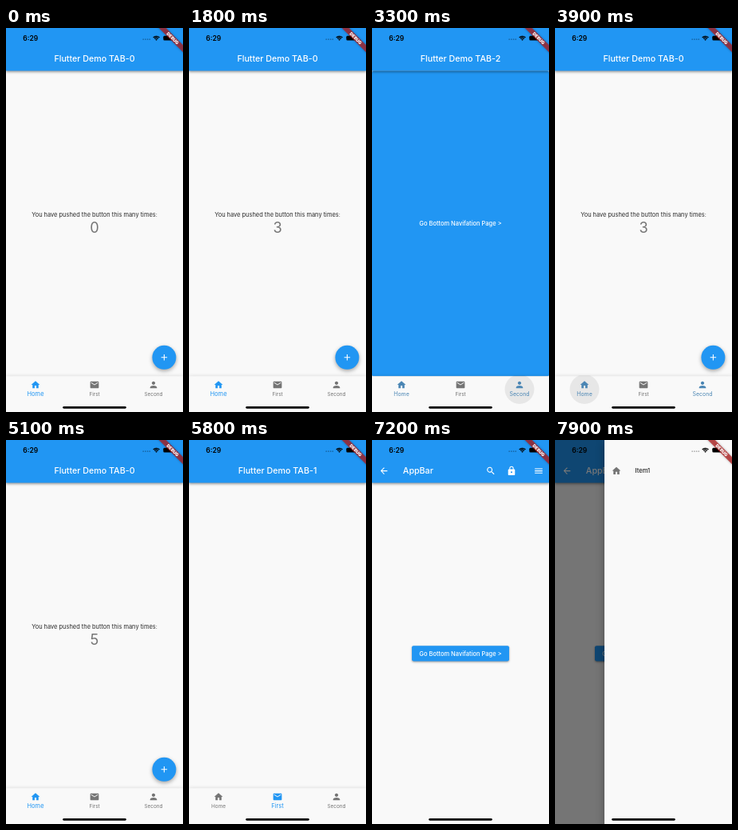
These frames come from a looping animation (222 by 480 pixels, 8 s). An HTML page with a canvas:

```html
<!DOCTYPE html>
<html lang="en">
<head>
<meta charset="utf-8">
<title>Tab demo</title>
<style>
html, body { margin: 0; width: 100%; height: 100%; overflow: hidden; background: #f9f9f9; }
canvas { display: block; width: 222px; height: 480px; }
</style>
</head>
<body>
<canvas id="stage"></canvas>
<script>
const W = 222, H = 480, LOOP = 8000, STEP = 100;
const BAR = 53.6, NAV = 435.3, MID = 38.6;
const BLUE = '#2196f3', PAPER = '#f9f9f9', GREY = '#757575';
const FONT = 'Inter, "Liberation Sans", sans-serif';

const canvas = document.getElementById('stage');
const c = canvas.getContext('2d');
const dpr = Math.max(1, window.devicePixelRatio || 1);
canvas.width = W * dpr;
canvas.height = H * dpr;

// 24-unit icon outlines
const ICON = {
  home: 'M10 20v-6h4v6h5v-8h3L12 3 2 12h3v8z',
  mail: 'M20 4H4c-1.1 0-2 .9-2 2v12c0 1.1.9 2 2 2h16c1.1 0 2-.9 2-2V6c0-1.1-.9-2-2-2zm0 4l-8 5-8-5V6l8 5 8-5v2z',
  person: 'M12 12c2.2 0 4-1.8 4-4s-1.8-4-4-4-4 1.8-4 4 1.8 4 4 4zm0 2c-2.7 0-8 1.3-8 4v2h16v-2c0-2.7-5.3-4-8-4z',
  add: 'M19 13h-6v6h-2v-6H5v-2h6V5h2v6h6v2z',
  back: 'M20 11H7.8l5.6-5.6L12 4l-8 8 8 8 1.4-1.4L7.8 13H20v-2z',
  search: 'M15.5 14h-.8l-.3-.3A6.5 6.5 0 1 0 13.7 14.4l.3.3v.8l5 5 1.5-1.5zM9.5 14a4.5 4.5 0 1 1 0-9 4.5 4.5 0 0 1 0 9z',
  lock: 'M18 8h-1V6a5 5 0 0 0-10 0v2H6c-1.1 0-2 .9-2 2v10c0 1.1.9 2 2 2h12c1.1 0 2-.9 2-2V10c0-1.1-.9-2-2-2zM12 17a2 2 0 1 1 0-4 2 2 0 0 1 0 4zM15.1 8H8.9V6a3.1 3.1 0 0 1 6.2 0z',
  menu: 'M3 18h18v-2H3zM3 13h18v-2H3zM3 6v2h18V6z'
};
for (const k in ICON) ICON[k] = new Path2D(ICON[k]);

const TABS = [
  { x: 37, label: 'Home', icon: 'home' },
  { x: 111, label: 'First', icon: 'mail' },
  { x: 185, label: 'Second', icon: 'person' }
];
// [time, tab]
const VISITS = [[-1000, 0], [2200, 1], [2600, 0], [3300, 2], [3900, 0], [5600, 1], [6000, 2]];
const TAPS = [700, 1100, 1500, 4700, 5100];
const PUSH = 6850, DRAWER = 7650, SLIDE = 340;

const clamp = v => Math.min(1, Math.max(0, v));
const mix = (a, b, p) => a + (b - a) * p;
const easeOut = u => 1 - Math.pow(1 - clamp(u), 3);

function shadow(alpha, blur, dy) {
  c.shadowColor = `rgba(0,0,0,${alpha})`;
  c.shadowBlur = blur * dpr;
  c.shadowOffsetY = dy * dpr;
}

function noShadow() {
  c.shadowColor = 'transparent';
  c.shadowBlur = c.shadowOffsetY = 0;
}

function box(x, y, w, h, color, r = 0) {
  c.fillStyle = color;
  c.beginPath();
  c.roundRect(x, y, w, h, r);
  c.fill();
}

function disc(x, y, r, color) {
  c.fillStyle = color;
  c.beginPath();
  c.arc(x, y, r, 0, 2 * Math.PI);
  c.fill();
}

function text(s, x, y, size, color, weight = 400, align = 'center') {
  c.font = `${weight} ${size}px ${FONT}`;
  c.textAlign = align;
  c.fillStyle = color;
  c.fillText(s, x, y + size * 0.36);
}

function icon(name, x, y, color) {
  const k = 0.536;
  c.save();
  c.translate(x - 12 * k, y - 12 * k);
  c.scale(k, k);
  c.fillStyle = color;
  c.fill(ICON[name], 'evenodd');
  c.restore();
}

function appBar() {
  shadow(0.4, 3, 1);
  box(0, 0, W, BAR, BLUE);
  noShadow();
}

function button(x, y, w, h) {
  shadow(0.4, 2.5, 1);
  box(x, y, w, h, BLUE, 2.1);
  noShadow();
  text('Go Bottom Navifation Page >', 111, y + h / 2, 7.5, '#fff', 500);
}

function counter(t) {
  const count = TAPS.filter(s => s <= t).length;
  text('You have pushed the button this many times:', 111, 233.5, 7.45, '#2b2b2b');
  text(count, 111, 249.3, 18.2, GREY);
  shadow(0.35, 5, 2);
  disc(198.4, 411.8, 15, BLUE);
  noShadow();
  const age = t - TAPS[count - 1];
  if (t >= 1100 && age > 0 && age < 300) {
    disc(198.4, 411.8, 15, `rgba(200,200,200,${0.15 * (1 - age / 300)})`);
  }
  icon('add', 198.4, 411.8, '#fff');
}

function navBar(t, at) {
  const [since, tab] = VISITS[at];
  const before = at ? VISITS[at - 1][1] : tab;
  const p = clamp((t - since + 100) / 200);
  const ripple = 1 - clamp((t - since) / 200);

  shadow(0.16, 5, -0.5);
  box(0, NAV, W, H - NAV, PAPER);
  noShadow();
  if (ripple > 0) {
    c.save();
    c.beginPath();
    c.rect(0, NAV - 1, W, H);
    c.clip();
    disc(TABS[tab].x, 451.5, 18.5, `rgba(0,0,0,${0.07 * ripple})`);
    c.restore();
  }
  TABS.forEach((item, i) => {
    const on = i === tab ? p : i === before ? 1 - p : 0;
    const color = `rgb(${mix(117, 33, on)},${mix(117, 150, on)},${mix(117, 243, on)})`;
    icon(item.icon, item.x, 446, color);
    text(item.label, item.x, 457.2, mix(6.4, 7.5, on), color);
  });
}

function tabsPage(t) {
  let at = VISITS.length - 1;
  while (VISITS[at][0] > t) at--;
  const tab = VISITS[at][1];
  box(0, 0, W, H, PAPER);
  if (tab === 0) counter(t);
  if (tab === 2) button(0, BAR, W, NAV - BAR);
  appBar();
  text('Flutter Demo TAB-' + tab, 111, MID, 10.7, '#fff', 500);
  navBar(t, at);
}

function detailPage() {
  shadow(0.25, 8, 0);
  box(0, 0, W, H, PAPER);
  noShadow();
  appBar();
  icon('back', 15, MID, '#fff');
  text('AppBar', 38.8, MID, 10.7, '#fff', 500, 'left');
  icon('search', 149, MID, '#fff');
  icon('lock', 175, MID, '#fff');
  icon('menu', 209, MID, '#fff');
  button(50, 257.2, 122, 19.2);
}

function drawer(p) {
  const x = W - 163 * p;
  box(0, 0, W, H, `rgba(0,0,0,${0.54 * p})`);
  shadow(0.35, 10, 3);
  box(x, 0, 163, H, PAPER);
  noShadow();
  icon('home', x + 15, MID, GREY);
  text('Item1', x + 38.6, MID, 7.5, '#222', 500, 'left');
}

function statusBar() {
  text('6:29', 30.7, 12.6, 8.5, '#000', 600);
  for (let i = 0; i < 4; i++) disc(172.2 + i * 2.7, 14.2, 0.85, 'rgba(0,0,0,.3)');
  c.strokeStyle = '#000';
  c.lineWidth = 1.3;
  for (const r of [3.2, 5.3]) {
    c.beginPath();
    c.arc(188.6, 15.6, r, -Math.PI * 0.76, -Math.PI * 0.24);
    c.stroke();
  }
  c.fillStyle = '#000';
  c.beginPath();
  c.moveTo(188.6, 15.8);
  c.arc(188.6, 15.8, 1.9, -Math.PI * 0.76, -Math.PI * 0.24);
  c.fill();
  box(197.3, 9.8, 11.6, 5.6, '#000', 1.5);
}

function ribbon() {
  c.save();
  c.translate(W, 0);
  c.rotate(Math.PI / 4);
  shadow(0.45, 3, 0);
  box(-24, 15, 48, 6.4, 'rgba(183,28,28,.72)');
  noShadow();
  text('DEBUG', 0, 18.2, 5.5, '#fff', 900);
  c.restore();
}

function draw(t) {
  c.setTransform(dpr, 0, 0, dpr, 0, 0);
  const push = easeOut((t - PUSH) / SLIDE);
  const open = easeOut((t - DRAWER) / SLIDE);

  c.save();
  c.translate(-W / 3 * push, 0);
  if (push < 1) tabsPage(t);
  c.restore();
  if (push > 0) {
    c.save();
    c.translate(W * (1 - push), 0);
    detailPage();
    c.restore();
  }
  if (open > 0) drawer(open);
  statusBar();
  ribbon();
  box(71.2, 473, 79.6, 2.7, '#000', 1.35);
}

const start = performance.now();
function frame() {
  const t = (performance.now() - start) % LOOP;
  draw(Math.floor(t / STEP) * STEP);
  requestAnimationFrame(frame);
}
frame();
</script>
</body>
</html>
```
